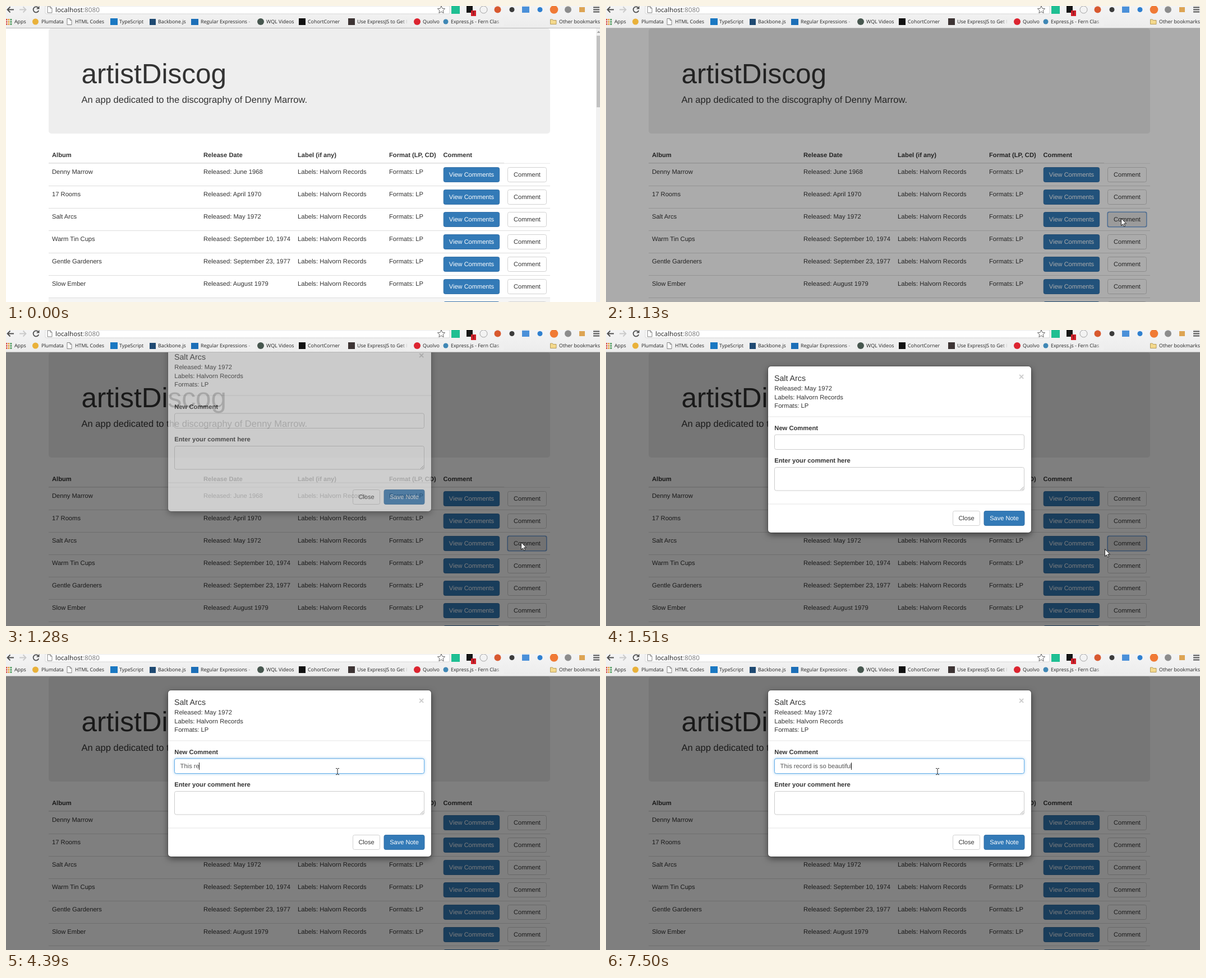
An HTML page that plays this animation: 1059 px wide and 529 px high, repeating every 8 s.

```html
<!DOCTYPE html>
<html lang="en">
<head>
<meta charset="utf-8">
<title>artistDiscog</title>
<style>
  html, body { margin: 0; width: 100%; height: 100%; overflow: hidden; background: #fff; }
  svg { display: block; width: 1059px; height: 529px; }
  text { font: 11.2px "Liberation Sans", Arial, sans-serif; fill: #333; white-space: pre; text-rendering: geometricPrecision; }
  .b { font-weight: bold; }
  .mid { text-anchor: middle; }
  .btn { font-size: 11.05px; }
  .light { fill: #fff; }
  .ui { font: 8.9px "Open Sans", sans-serif; fill: #222; }
  .url { font-size: 11.7px; }
  .primary { fill: #337ab7; stroke: #2e6da4; }
  .plain { fill: #fff; stroke: #ccc; }

  .anim { animation: 8s step-end infinite; }
  #hover { animation-name: hover; }
  #scroll { animation-name: scroll; }
  #press { animation-name: press; }
  #ring { animation-name: ring; }
  #shade { animation-name: shade; }
  #modal { animation-name: modal; }
  #glow { animation-name: glow; }
  #cursor { animation-name: move; }
  #arrow { animation-name: arrow; }
  #beam { animation-name: beam; }

  @keyframes hover {
    0% { transform: translateY(240px); opacity: 1; }
    1.875% { transform: translateY(200px); opacity: 1; }
    3.7% { transform: translateY(160px); opacity: 1; }
    5.5% { transform: translateY(120px); opacity: 1; }
    7.2% { transform: translateY(80px); opacity: 1; }
    13.125%, 100% { transform: translateY(80px); opacity: 0; }
  }
  @keyframes scroll { 0% { opacity: 1; } 13.125%, 100% { opacity: 0; } }
  @keyframes press { 0% { opacity: 0; } 7.3% { opacity: 1; } 31.625%, 100% { opacity: 0; } }
  @keyframes ring { 0% { opacity: 0; } 12.125% { opacity: 1; } 31.625%, 100% { opacity: 0; } }
  @keyframes shade {
    0% { opacity: 0; }
    13.125% { opacity: .07; }
    14.125% { opacity: .33; }
    15.06%, 100% { opacity: .5; }
  }
  @keyframes modal {
    0% { opacity: 0; transform: translateY(-74px); }
    15.06% { opacity: .1; transform: translateY(-67px); }
    16% { opacity: .62; transform: translateY(-38px); }
    16.96% { opacity: 1; transform: translateY(-17px); }
    17.9% { opacity: 1; transform: translateY(-4px); }
    18.875%, 100% { opacity: 1; transform: none; }
  }
  @keyframes glow {
    0% { opacity: 0; }
    31.625% { opacity: .1; }
    32.5% { opacity: .6; }
    33.375%, 100% { opacity: 1; }
  }
  @keyframes move {
    0% { transform: translate(971px, 532px); }
    .875% { transform: translate(970px, 524px); animation-timing-function: steps(4); }
    4.6% { transform: translate(944px, 455px); animation-timing-function: steps(4); }
    8.25% { transform: translate(918px, 379px); }
    16.01% { transform: translate(918px, 379px); animation-timing-function: steps(3); }
    18.875% { transform: translate(889px, 391px); animation-timing-function: steps(5); }
    23.75% { transform: translate(690px, 300px); }
    25.625% { transform: translate(670px, 281px); animation-timing-function: steps(5); }
    30.6%, 100% { transform: translate(591px, 210px); }
  }
  @keyframes arrow { 0% { opacity: 1; } 25.625%, 100% { opacity: 0; } }
  @keyframes beam { 0% { opacity: 0; } 25.625%, 100% { opacity: 1; } }
</style>
</head>
<body>
<svg viewBox="0 0 1059 529">
  <defs>
    <linearGradient id="bar" x2="0" y2="1">
      <stop stop-color="#f4f4f4"/><stop offset="1" stop-color="#ececec"/>
    </linearGradient>
    <linearGradient id="fade">
      <stop stop-color="#efefef" stop-opacity="0"/><stop offset=".8" stop-color="#efefef"/>
    </linearGradient>
  </defs>

  <rect width="1059" height="529" fill="#fff"/>
  <rect x="76" y="40" width="894" height="188" rx="5" fill="#eee"/>
  <text x="134.5" y="138" style="font-size:49.5px">artistDiscog</text>
  <text x="134.5" y="172.6" style="font-size:16.55px">An app dedicated to the discography of Denny Marrow.</text>
  <rect id="hover" class="anim" x="76" y="282" width="894" height="39" fill="#f5f5f5"/>
  <g id="table"></g>
  <g id="scroll" class="anim">
    <path d="M1052 40h7v489h-7z" fill="#f1f1f1"/>
    <path d="M1053 53h6v128h-6z" fill="#c1c1c1"/>
    <path d="M1053.5 48l3-3.500 3 3.500z" fill="#a0a0a0"/>
  </g>
  <rect id="shade" class="anim" y="40" width="1059" height="489"/>

  <g id="modal" class="anim">
    <rect x="289" y="65" width="469" height="297" rx="5" fill="#fff" style="filter:drop-shadow(0 4px 6px rgba(0,0,0,.5))"/>
    <rect x="288.600" y="64.600" width="469.800" height="297.800" rx="5" fill="none" stroke="#000" stroke-opacity=".25" stroke-width=".8"/>
    <text x="300" y="90.500" style="font-size:14.2px">Salt Arcs</text>
    <text x="300.300" y="108">Released: May 1972</text>
    <text x="300.300" y="123.500">Labels: Halvorn Records</text>
    <text x="300.300" y="139.300">Formats: LP</text>
    <text class="b mid" x="740.700" y="88.500" style="font-size:16.8px;fill:#ccc">×</text>
    <path d="M289 155h469M289 311h469" stroke="#e5e5e5"/>
    <text class="b" x="300.300" y="179">New Comment</text>
    <rect class="plain" x="300.500" y="187" width="445" height="26.500" rx="3"/>
    <rect id="glow" class="anim" x="300.500" y="187" width="445" height="26.500" rx="3" fill="#fff" stroke="#66afe9" style="filter:drop-shadow(0 0 2.5px rgba(102,175,233,.65))"/>
    <text id="typed" x="310.600" y="204" style="fill:#555"></text>
    <path id="caret" d="M0 194v13" stroke="#333"/>
    <text class="b" x="300.300" y="237">Enter your comment here</text>
    <rect class="plain" x="300.500" y="245.500" width="445" height="41.500" rx="3"/>
    <path d="M739 286l5.500-5.500M742 286l2.500-2.500" stroke="#888" stroke-width=".8"/>
    <g id="actions"></g>
  </g>

  <g id="chrome">
    <rect width="1059" height="40" fill="url(#bar)"/>
    <path d="M70 0h721v12q0 2-2 2H72q-2 0-2-2z" fill="#fff" stroke="#cfcfcf" stroke-width=".8"/>
    <path d="M0 39.500h1059" stroke="#b5b5b5"/>
    <g fill="none" stroke="#505050" stroke-width="1.800">
      <path d="M14 6.500H3M7.500 1.500l-5 5 5 5"/>
      <path d="M24 6.500h11M30.500 1.500l5 5-5 5" stroke="#cacaca"/>
      <path d="M57.500 3.200a5 5 0 1 0 .8 5"/>
      <path d="M1047 2.500h11M1047 6.500h11M1047 10.500h11"/>
    </g>
    <path d="M59.500 0v5.500H54z" fill="#505050"/>
    <path d="M776 0l1.900 4.300 4.700.5-3.500 3.200 1 4.600-4.100-2.400-4.100 2.400 1-4.600-3.500-3.200 4.700-.5z" fill="none" stroke="#666"/>
    <text class="ui url" x="88" y="11">localhost<tspan fill="#777">:8080</tspan></text>
    <path d="M970.500 32.500v-8.500h4l1 1.500h5.500v7z" fill="#f4d98d" stroke="#a98b45" stroke-width=".8"/>
    <g id="icons"></g>
    <g id="marks"></g>
  </g>

  <g id="cursor" class="anim">
    <path id="arrow" class="anim" d="M.5.500v13l3-2.800 2 4.500 2-.9-2-4.400h4z" fill="#fff" stroke="#111" stroke-width=".9"/>
    <path id="beam" class="anim" d="M-3-5.500h2l1 1 1-1h2M0-4.500v9M-3 5.500h2l1-1 1 1h2" fill="none" stroke="#222"/>
  </g>
</svg>

<script>
const $ = id => document.getElementById(id);
const text = (x, y, s, cls = "") => `<text x="${x}" y="${y}" class="${cls}">${s}</text>`;
const box = (x, y, w, h, fill) => `<rect x="${x}" y="${y}" width="${w}" height="${h}" fill="${fill}"/>`;
const dot = (x, y, r, fill) => `<circle cx="${x}" cy="${y}" r="${r}" fill="${fill}"/>`;
const page = (x, y) =>
  `<path d="M${x} ${y}h5l3 3v8h-8zM${x + 5} ${y}v3h3" fill="#fff" stroke="#777" stroke-width=".9"/>`;
const button = (x, y, w, label, kind, extra = "") =>
  `<rect class="${kind}" x="${x}" y="${y + .5}" width="${w}" height="26" rx="3" stroke-width=".9"/>` + extra +
  text(x + w / 2, y + 17.2, label, kind === "primary" ? "btn mid light" : "btn mid");

// Album table
const heads = [[82, "Album"], [352, "Release Date"], [520, "Label (if any)"], [683, "Format (LP, CD)"], [779.5, "Comment"]];
const albums = [
  ["Denny Marrow", "June 1968"], ["17 Rooms", "April 1970"], ["Salt Arcs", "May 1972"],
  ["Warm Tin Cups", "September 10, 1974"], ["Gentle Gardeners", "September 23, 1977"],
  ["Slow Ember", "August 1979"], ["Paper Orchard", "January 1983"]
];
const pressed = `
  <rect id="press" class="anim" x="894.5" y="368.5" width="69" height="26" rx="3" fill="#e6e6e6" stroke="#adadad"/>
  <rect id="ring" class="anim" x="894.2" y="368.2" width="69.6" height="26.6" rx="2.5" fill="none" stroke="#74a3dc" stroke-width="1.5"/>`;

$("table").innerHTML =
  heads.map(([x, s]) => text(x, 270, s, "b")).join("") +
  `<path d="M76 280.700h812" stroke="#ddd" stroke-width="1.600"/><path d="M888 281.300h82" stroke="#e4e4e4" stroke-width=".8"/>` +
  albums.map(([name, date], i) => {
    const y = 281 + i * 40;
    return (i ? `<path d="M76 ${y + .5}h894" stroke="#ddd"/>` : "") +
      text(82, y + 19, name) +
      text(352, y + 19, "Released: " + date) +
      text(520, y + 19, "Labels: Halvorn Records") +
      text(683, y + 19, "Formats: LP") +
      button(780.2, y + 7, 99.5, "View Comments", "primary") +
      button(894.5, y + 7, 69, "Comment", "plain", i === 2 ? pressed : "");
  }).join("");

$("actions").innerHTML =
  button(618.5, 323, 48, "Close", "plain") + button(674, 323, 72, "Save Note", "primary");

// Browser bars
const apps = ["#d9534f", "#e8a33d", "#4c9a5b", "#4a86c8"];
$("icons").innerHTML =
  page(74, 1) + page(109, 22.5) +
  Array.from({ length: 9 }, (_, i) => box(i % 3 * 4 - .5, 23 + (i / 3 | 0) * 4, 2.8, 2.8, apps[(i + (i / 3 | 0)) % 4])).join("") +
  box(794, 0, 15, 14, "#1fbf92") +
  box(821, 0, 11, 12, "#161616") + box(829, 8, 9, 10, "#d3202a") + `<g fill="#fff">${text(833.5, 16, "1", "ui mid b light")}</g>` +
  `<circle cx="851.500" cy="6.500" r="6.500" fill="none" stroke="#a5a5a5"/>` +
  dot(876.5, 6.5, 6, "#d8592f") + dot(902, 6.5, 4.5, "#3c3c3c") + box(920, 1, 13, 11, "#4a90d9") +
  dot(952, 6.5, 4.5, "#2f80d0") + dot(977, 6.5, 7.3, "#f07a35") + dot(1002, 6.5, 6, "#8c8c8c") +
  box(1022, 2, 10, 9, "#dda454") +
  dot(52.5, 28, 5.5, "#e9b13a") + box(186, 22, 13, 12, "#1a78c2") + box(256, 23, 11, 11, "#1f4a72") +
  box(330, 23, 13, 11, "#1c6fb8") + dot(454, 28, 6, "#47574f") + box(522, 22, 12, 12, "#111") +
  box(610, 22, 12, 12, "#3d3434") + dot(733, 28, 6, "#dc2430") + dot(784, 28, 4.5, "#3f87b5");

const marks = [
  [15, "Apps"], [63, "Plumdata"], [123, "HTML Codes"], [202, "TypeScript"], [271, "Backbone.js"],
  [347, "Regular Expressions -"], [464, "WQL Videos"], [538, "CohortCorner"],
  [626, "Use ExpressJS to Get I"], [743, "Quolvo"], [793, "Express.js - Fern Clas"], [986, "Other bookmarks"]
];
$("marks").innerHTML =
  marks.map(([x, s]) => text(x, 31.4, s, "ui")).join("") +
  [428, 704, 872].map(x => box(x, 21, 16, 15, "url(#fade)")).join("");

// Typing: start, end and characters of each burst
const bursts = [
  [3210, 3210, "T"], [3520, 4560, "his reco"], [4630, 5490, "rd is "],
  [5720, 6650, "so beau"], [6810, 7180, "tifu"], [7500, 7500, "l"]
];
const keys = bursts.flatMap(([from, to, s]) =>
  [...s].map((c, i) => ({ c, at: from + (to - from) * i / Math.max(1, s.length - 1) })));
const typed = $("typed"), caret = $("caret");
let start, shown;

function tick(now) {
  start ??= now;
  const t = (now - start) % 8000;
  const s = keys.filter(k => k.at <= t).map(k => k.c).join("");
  if (s !== shown) {
    typed.textContent = shown = s;
    const x = 310.8 + (s ? typed.getComputedTextLength() : 0);
    caret.setAttribute("transform", `translate(${Math.round(x) - .5})`);
  }
  caret.style.opacity = s || (t >= 2530 && t < 3060) ? 1 : 0;
  requestAnimationFrame(tick);
}
requestAnimationFrame(tick);
</script>
</body>
</html>
```
